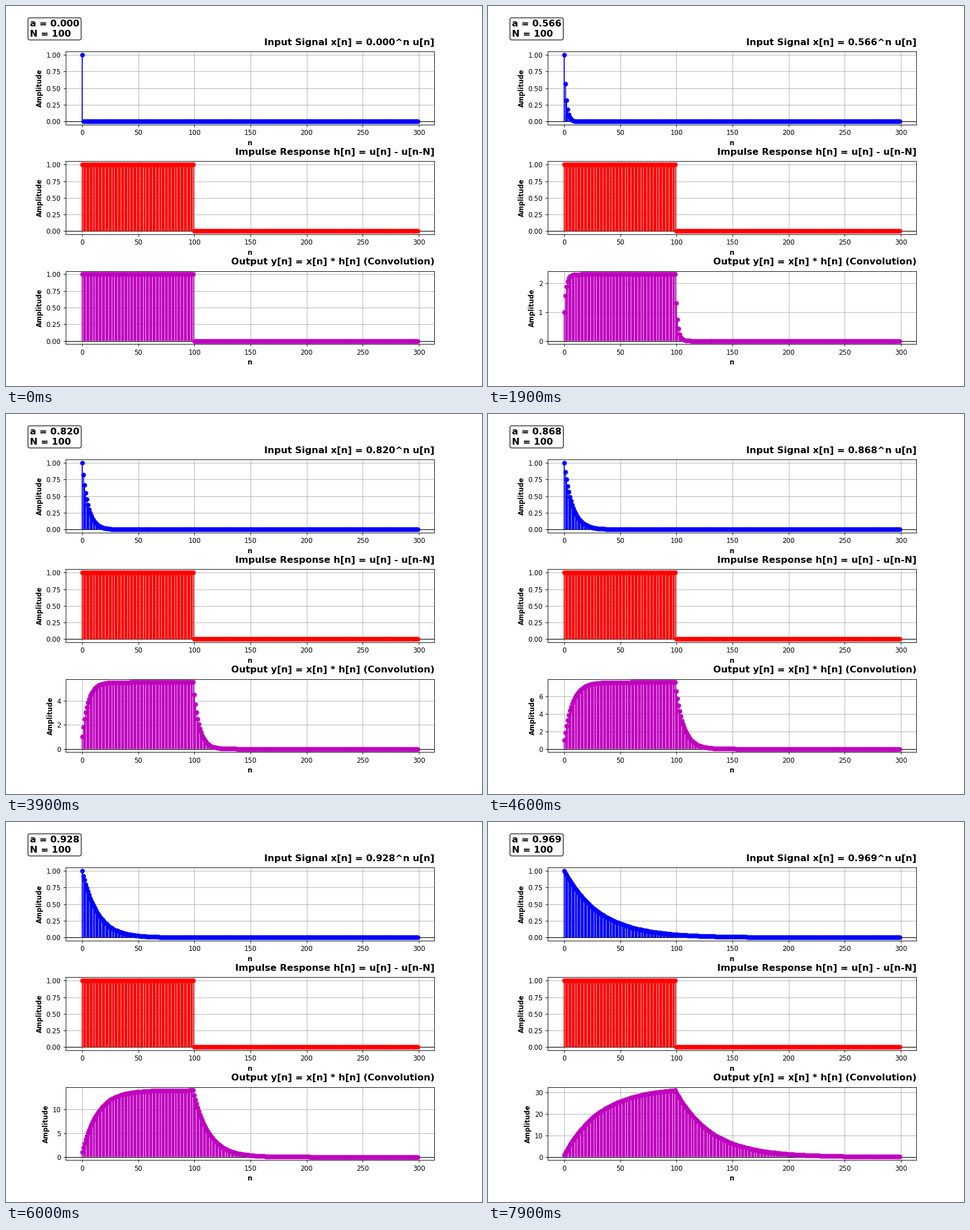
Recreate the animation shown at these times as a matplotlib script. Size 837 by 669 pixels, loop 8 s.

```python
import numpy as np
import matplotlib.pyplot as plt
from matplotlib.animation import FuncAnimation

plt.rcParams["font.family"] = "DejaVu Sans"
plt.rcParams["path.simplify"] = False

DPI = 83.7
FRAMES = 80
COUNT = 300          # samples shown
N = 100              # pulse length
MARGIN = 0.05
DECAY = 0.957        # 1 - a shrinks by this factor every step

n = np.arange(COUNT)
pulse = (n < N).astype(float)

# Stems sit on a 1000 px wide grid, which leaves thin white gaps between them.
pad = MARGIN * (COUNT - 1)
unit = 775 / (COUNT - 1 + 2 * pad)
stem_x = (np.floor(125.5 + (n + pad) * unit) - 125) / unit - pad

# The tiny surplus keeps the pixel size from being truncated.
fig, axes = plt.subplots(3, 1, figsize=(837.01 / DPI, 669.01 / DPI), dpi=DPI)
fig.subplots_adjust(left=0.125, right=0.9, bottom=0.11, top=0.88, hspace=0.5)


class Panel:
    def __init__(self, ax, color, title):
        self.ax = ax
        self.title = ax.set_title(title, loc="right", pad=10,
                                  fontsize=14, fontweight="bold")
        ax.set_xlabel("n", fontweight="bold")
        ax.set_ylabel("Amplitude", fontweight="bold")
        ax.set_xlim(-pad, COUNT - 1 + pad)
        ax.grid(True)
        ax.axhline(0, color="black", lw=1)
        self.stems, = ax.plot([], [], color=color, lw=1.5,
                              solid_capstyle="butt", snap=False)
        self.heads, = ax.plot([], [], color=color, ls="", marker="o", ms=6)

    def show(self, y):
        gap = np.full(COUNT, np.nan)
        ys = np.column_stack([np.zeros(COUNT), y, gap]).ravel()
        self.stems.set_data(np.repeat(stem_x, 3), ys)
        self.heads.set_data(n, y)
        top = y.max()
        self.ax.set_ylim(-MARGIN * top, (1 + MARGIN) * top)


signal = Panel(axes[0], "b", "")
response = Panel(axes[1], "r", "Impulse Response h[n] = u[n] - u[n-N]")
output = Panel(axes[2], "m", "Output y[n] = x[n] * h[n] (Convolution)")
response.show(pulse)

info = fig.text(0.05, 0.92, "", fontsize=14, fontweight="bold",
                bbox=dict(boxstyle="round,pad=0.2", fc="white", ec="black"))


def update(frame):
    a = 1 - DECAY ** frame
    x = a ** n
    signal.show(x)
    signal.title.set_text(f"Input Signal x[n] = {a:.3f}^n u[n]")
    output.show(np.convolve(x, pulse)[:COUNT])
    info.set_text(f"a = {a:.3f}\nN = {N}")
    return []


anim = FuncAnimation(fig, update, frames=FRAMES, interval=100,
                     init_func=lambda: update(0), repeat=True, blit=False)
plt.show()
```
